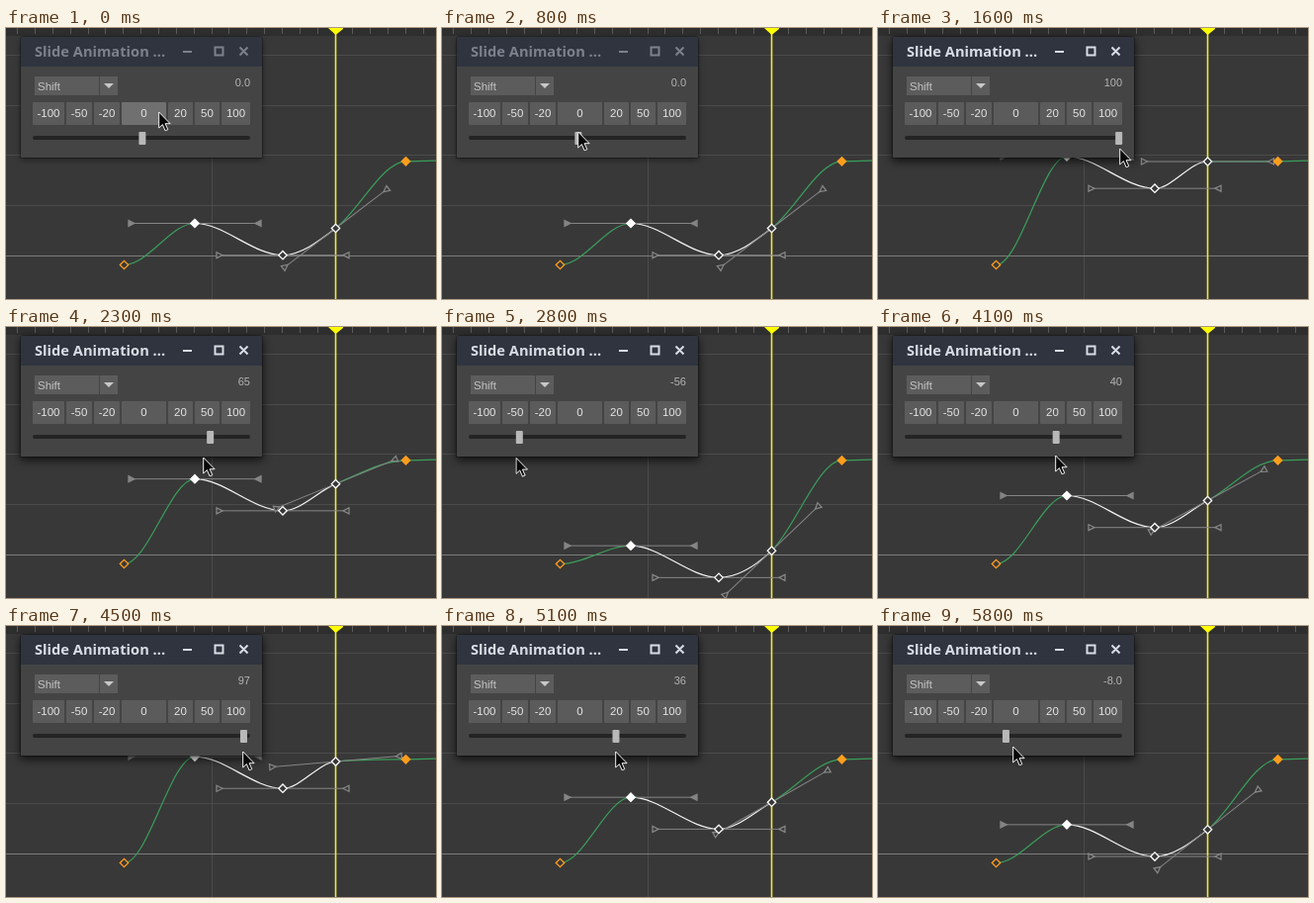
Animation of 435x274 px, one loop 6.5 s. Source, as an HTML page with a canvas:

```html
<!DOCTYPE html>
<html lang="en">
<head>
<meta charset="utf-8">
<title>Slide Animation</title>
<style>
html, body { margin: 0; width: 100%; height: 100%; overflow: hidden; background: #383838; }
#stage { position: relative; width: 435px; height: 274px; overflow: hidden; }
#graph, #mouse { position: absolute; left: 0; top: 0; }
#win {
  position: absolute; left: 15px; top: 9px; width: 244px; height: 122px;
  background: #444; border-radius: 3px 3px 0 0; color: #7c818c;
  font: 11.5px "Liberation Sans", Arial, sans-serif;
  box-shadow: 0 0 0 1px rgba(0,0,0,.3), 0 2px 6px rgba(0,0,0,.45);
}
#win.active { color: #d8dde5; box-shadow: 0 0 0 1px rgba(0,0,0,.3), 0 3px 8px 1px rgba(0,0,0,.65); }
#bar { position: absolute; left: 0; top: 0; width: 244px; height: 30px; background: #2f343f; border-radius: 3px 3px 0 0; }
#bar b { position: absolute; left: 14px; top: 0; font: bold 14.67px/29px "Noto Sans", sans-serif; white-space: pre; }
#bar svg { position: absolute; left: 0; top: 0; fill: none; stroke: currentColor; stroke-width: 2; }
#combo {
  position: absolute; left: 14px; top: 40px; width: 81px; height: 19px; padding-left: 3px;
  background: linear-gradient(90deg, #5c5c5c 65px, #444 65px, #444 66px, #5c5c5c 66px);
  line-height: 20px; color: #c4c4c4;
}
#combo::after {
  content: ""; position: absolute; left: 70px; top: 7px;
  border: 5px solid transparent; border-top-color: #c8c8c8; border-bottom: 0;
}
#val { position: absolute; right: 12px; top: 39px; font-size: 11px; line-height: 14px; color: #b4b4b4; }
.btn { position: absolute; top: 66px; height: 23px; line-height: 23px; text-align: center; background: #5b5b5b; color: #e4e4e4; border-radius: 1px; }
.btn.hover { background: #707070; }
#groove { position: absolute; left: 12px; top: 100px; width: 220px; height: 4px; border-radius: 2px; background: #242424; }
#thumb { position: absolute; left: 0; top: 96px; width: 7px; height: 13px; border-radius: 1px; background: #b8b8b8; }
</style>
</head>
<body>
<div id="stage">
  <canvas id="graph" width="435" height="274"></canvas>
  <div id="win">
    <div id="bar">
      <b>Slide Animation ...</b>
      <svg width="244" height="30"><path d="M164 15h9M196.500 10.500h8v8h-8zM221.500 10.500l8 8M229.500 10.500l-8 8"/></svg>
    </div>
    <div id="combo">Shift</div>
    <div id="val"></div>
    <div id="groove"></div>
    <div id="thumb"></div>
  </div>
  <svg id="mouse" width="16" height="24">
    <path d="M.7 1v16l3.700-3.400 2.700 6.200 2.700-1.100-2.700-6h5z" fill="#080808" stroke="#f4f4f4" stroke-width="1"/>
  </svg>
</div>
<script>
const LOOP = 6500, STEP = 100;
const $ = id => document.getElementById(id);
const g = $("graph").getContext("2d");
const win = $("win");

// time, pointer x, pointer y, slider value
const track = [
  [0, 154, 84, 0], [100, 154, 84, 0], [400, 140, 97, 0], [500, 140, 97, 0],
  [800, 137, 104, 0], [900, 147, 107, 9], [1100, 196, 113, 56], [1300, 236, 119, 92],
  [1500, 245, 121, 100], [1600, 244, 121, 100], [1800, 240, 123, 98], [1900, 240, 123, 98],
  [2100, 226, 127, 88], [2300, 199, 131, 65], [2600, 123, 132, -9], [2900, 50, 131, -80],
  [3100, 22, 130, -100], [3300, 1, 130, -100], [3400, 1, 130, -100], [3600, 29, 130, -100],
  [3800, 72, 130, -60], [4100, 179, 129, 40], [4300, 227, 127, 85], [4500, 239, 126, 97],
  [4800, 236, 126, 95], [5100, 175, 126, 36], [5400, 127, 126, -8], [5500, 127, 126, -8],
  [5700, 119, 128, -8], [5800, 136, 121, -8], [LOOP, 136, 121, -8]
];

const buttons = [[-100, 12, 32], [-50, 46, 26], [-20, 74, 26], [0, 102, 45], [20, 149, 25], [50, 176, 25], [100, 203, 29]]
  .map(([label, x, w]) => {
    const b = document.createElement("div");
    b.className = "btn";
    b.textContent = label;
    b.style.left = x + "px";
    b.style.width = w + "px";
    return win.appendChild(b);
  });

function sample(t) {
  const i = track.findIndex(r => r[0] > t), a = track[i - 1], b = track[i];
  const k = (t - a[0]) / (b[0] - a[0]);
  return a.map((n, j) => n + (b[j] - n) * k);
}

function line(color, x1, y1, x2, y2, w = 1) {
  g.strokeStyle = color;
  g.lineWidth = w;
  g.beginPath();
  g.moveTo(x1, y1);
  g.lineTo(x2, y2);
  g.stroke();
}

function shape(points, stroke, fill) {
  g.beginPath();
  points.forEach(p => g.lineTo(...p));
  g.closePath();
  g.fillStyle = fill;
  g.fill();
  if (!stroke) return;
  g.strokeStyle = stroke;
  g.lineWidth = 1.3;
  g.stroke();
}

// Hermite segment; each key is {x, y, m} with slope m
function curve(p, q, color) {
  const d = (q.x - p.x) / 3;
  g.strokeStyle = color;
  g.lineWidth = 1.2;
  g.beginPath();
  g.moveTo(p.x, p.y);
  g.bezierCurveTo(p.x + d, p.y + p.m * d, q.x - d, q.y - q.m * d, q.x, q.y);
  g.stroke();
}

function handles(k, solid) {
  for (const side of [0, Math.PI]) {
    g.save();
    g.translate(k.x, k.y);
    g.rotate(Math.atan(k.m) + side);
    line("#858585", 0, 0, 64.5, 0);
    shape([[61, 0], [67, -3], [67, 3]], "#858585", solid ? "#858585" : "#383838");
    g.restore();
  }
}

function diamond(k, color, solid) {
  const { x, y } = k, r = 4.2;
  shape([[x - r, y], [x, y - r], [x + r, y], [x, y + r]], color, solid ? color : "#383838");
}

function drawGrid() {
  g.fillStyle = "#383838";
  g.fillRect(0, 0, 435, 274);
  for (let i = 1; i < 5; i++) line("#4b4b4b", 0, Math.floor(230 - i * 50.6) + .5, 435, Math.floor(230 - i * 50.6) + .5);
  line("#4b4b4b", 208.5, 8, 208.5, 274);
  line("#7c7c7c", 0, 230.5, 435, 230.5);
  g.fillStyle = "#2e2e2e";
  g.fillRect(0, 0, 435, 8);
  for (let i = -11; i < 13; i++) {
    const x = Math.floor(208 + i * 17.85) + .5;
    line("#5a5a5a", x, 0, x, 6);
  }
  line("#eee64a", 333.5, 0, 333.5, 274, 1.6);
  shape([[326, 0], [341, 0], [341, 1], [333.5, 7]], null, "#ffff00");
}

function drawCurves(v) {
  const dy = -v / 100 * (v > 0 ? 67.5 : 42);
  const first = { x: 119.5, y: 239.5, m: 0 };
  const a = { x: 191, y: 197.5 + dy, m: 0 };
  const b = { x: 280, y: 229.7 + dy, m: 0 };
  const c = { x: 333.5, y: 202.5 + dy };
  const last = { x: 404.5, y: 134.8, m: -.012 };
  // neighbour slope, limited so the curve never overshoots
  c.m = Math.max((last.y - b.y) / (last.x - b.x), 3 * (135 - c.y) / (last.x - c.x));

  const green = "#3a9e5a", white = "#f2f2f2", orange = "#ff9d1e";
  curve(first, a, green);
  curve(a, b, white);
  curve(b, c, white);
  curve(c, last, green);
  curve(last, { x: 480, y: 133.5, m: 0 }, green);
  handles(a, true);
  handles(b);
  handles(c);
  diamond(first, orange);
  diamond(a, "#fff", true);
  diamond(b, "#fff");
  diamond(c, "#fff");
  diamond(last, orange, true);
}

function render(now) {
  const t = Math.floor(now % LOOP / STEP) * STEP;
  const [, x, y, v] = sample(t);
  drawGrid();
  drawCurves(v);
  win.classList.toggle("active", t >= 900);
  buttons[3].classList.toggle("hover", t < 300);
  $("val").textContent = Math.abs(v) < 9.95 ? v.toFixed(1) : v.toFixed(0);
  $("thumb").style.transform = `translateX(${119.4 + v * 1.0575}px)`;
  $("mouse").style.transform = `translate(${x}px, ${y}px)`;
}

function loop() {
  render(performance.now());
  requestAnimationFrame(loop);
}
loop();
</script>
</body>
</html>
```
